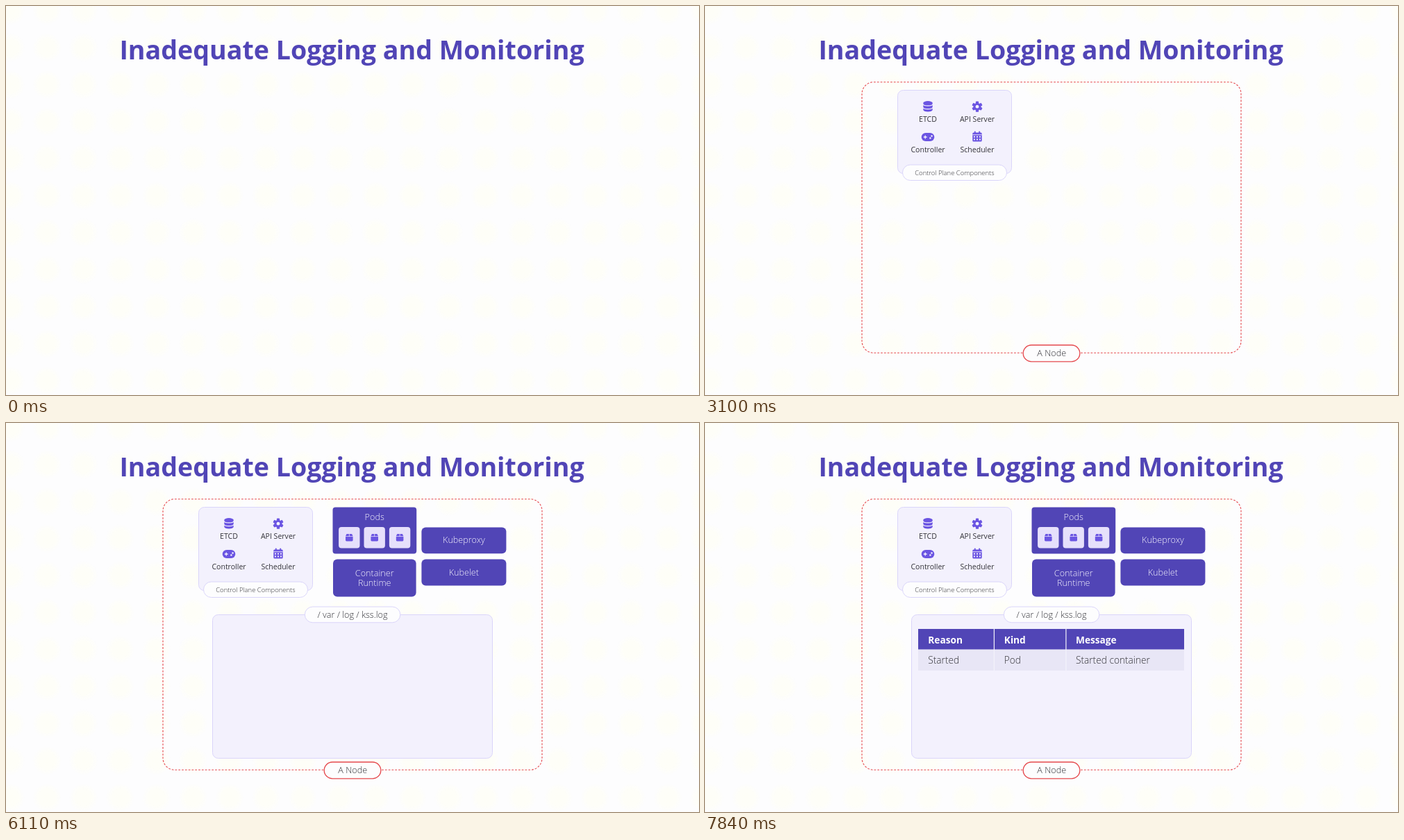
These frames come from a looping animation (998x561 px, 8 s). An HTML page with a canvas:

```html
<!DOCTYPE html>
<html lang="en">
<head>
<meta charset="utf-8">
<title>Inadequate Logging and Monitoring</title>
<style>
  html, body { margin: 0; width: 100%; height: 100%; overflow: hidden; background: #fdfdfe; }
  body {
    background-image: radial-gradient(circle, #fefef7 0, #fefef8 12px, transparent 21px);
    background-size: 52.6px 53.4px;
    background-position: -19.9px -20.2px;
  }
  canvas { display: block; width: 998px; height: 561px; }
</style>
</head>
<body>
<canvas id="stage"></canvas>
<script>
const W = 998, H = 561, LOOP = 8000;
const INDIGO = '#5145b6', VIOLET = '#6b55e2', LILAC = '#f3f1fd', EDGE = '#dad5fa';
const RED = '#e5484d', PAPER = '#fdfdfe', INK = '#333338', PALE = '#f4f2fd';
const dpr = window.devicePixelRatio || 1;

function prepare(canvas) {
  canvas.width = Math.round(W * dpr);
  canvas.height = Math.round(H * dpr);
  const c = canvas.getContext('2d');
  c.scale(dpr, dpr);
  return c;
}

function layer(draw) {
  const canvas = document.createElement('canvas');
  draw(prepare(canvas));
  return canvas;
}

function text(c, str, x, y, size, weight, color, align = 'center') {
  c.font = `${weight} ${size}px "Open Sans", sans-serif`;
  c.textAlign = align;
  c.fillStyle = color;
  c.fillText(str, x, y);
}

function box(c, x0, y0, x1, y1, r, fill, stroke, width = 1) {
  c.beginPath();
  c.roundRect(x0, y0, x1 - x0, y1 - y0, r);
  if (fill) { c.fillStyle = fill; c.fill(); }
  if (stroke) { c.strokeStyle = stroke; c.lineWidth = width; c.stroke(); }
}

function disc(c, x, y, r, fill) {
  c.beginPath();
  c.arc(x, y, r, 0, Math.PI * 2);
  c.fillStyle = fill;
  c.fill();
}

function database(c, x, y) {
  c.fillStyle = VIOLET;
  c.beginPath();
  c.ellipse(x, y - 5, 6.7, 2.7, 0, Math.PI, 0);
  c.lineTo(x + 6.7, y + 5);
  c.ellipse(x, y + 5, 6.7, 2.7, 0, 0, Math.PI);
  c.closePath();
  c.fill();
  c.strokeStyle = LILAC;
  c.lineWidth = 1.1;
  for (const dy of [-3.6, 1.1]) {
    c.beginPath();
    c.ellipse(x, y + dy, 7, 2.7, 0, 0, Math.PI);
    c.stroke();
  }
}

function gear(c, x, y) {
  disc(c, x, y, 5.5, VIOLET);
  for (let i = 0; i < 6; i++) {
    c.save();
    c.translate(x, y);
    c.rotate(i * Math.PI / 3);
    box(c, -2.1, -7.6, 2.1, -4, 0.9, VIOLET);
    c.restore();
  }
  disc(c, x, y, 2.4, LILAC);
}

function gamepad(c, x, y) {
  box(c, x - 9.3, y - 6, x + 9.3, y + 6, 6, VIOLET);
  box(c, x - 6.3, y - 0.7, x - 1.3, y + 0.7, 0.5, LILAC);
  box(c, x - 4.5, y - 2.5, x - 3.1, y + 2.5, 0.5, LILAC);
  disc(c, x + 3.4, y + 1.6, 1.25, LILAC);
  disc(c, x + 5.5, y - 1.6, 1.25, LILAC);
}

function calendar(c, x, y) {
  box(c, x - 6.7, y - 5.6, x + 6.7, y + 7.6, 1.5, VIOLET);
  for (const dx of [-3.2, 3.2]) box(c, x + dx - 0.9, y - 7.6, x + dx + 0.9, y - 3, 0.9, VIOLET);
  c.fillStyle = LILAC;
  c.fillRect(x - 6.7, y - 2.7, 13.4, 0.9);
  for (const dx of [-4, 0, 4])
    for (const dy of [0.6, 4.4]) c.fillRect(x + dx - 1, y + dy - 0.9, 2, 1.9);
}

function parcel(c, x, y) {
  box(c, x - 15.2, y - 15.2, x + 15.2, y + 15.2, 4, '#e6e0fb');
  c.fillStyle = VIOLET;
  for (const s of [-1, 1]) {
    c.beginPath();
    c.moveTo(x + s * 0.4, y - 5.2);
    c.lineTo(x + s * 3.8, y - 5.2);
    c.lineTo(x + s * 5.3, y - 2);
    c.lineTo(x + s * 0.4, y - 2);
    c.fill();
  }
  box(c, x - 5.3, y - 1.3, x + 5.3, y + 5.2, [0, 0, 1.4, 1.4], VIOLET);
}

const node = layer(c => {
  c.setLineDash([2.8, 2]);
  box(c, 226, 109.7, 772, 500.3, 17, null, RED, 1.1);
  c.setLineDash([]);
  box(c, 458.2, 489, 539.8, 512.8, 11.9, PAPER, RED, 1.3);
  text(c, 'A Node', 499.2, 505.3, 12.6, 300, INK);
});

const controlPlane = layer(c => {
  box(c, 277.5, 121.5, 441.5, 241.5, 8, LILAC, EDGE);
  database(c, 321, 144.8);
  gear(c, 392, 145.2);
  gamepad(c, 321, 189);
  calendar(c, 392, 188);
  text(c, 'ETCD', 321, 166.5, 10.55, 400, INK);
  text(c, 'API Server', 392, 166.5, 10.55, 400, INK);
  text(c, 'Controller', 321, 210.7, 10.55, 400, INK);
  text(c, 'Scheduler', 392, 210.7, 10.55, 400, INK);
  box(c, 284.5, 229, 434.5, 251.5, 11.2, PAPER, EDGE);
  text(c, 'Control Plane Components', 359.4, 243.6, 9.45, 300, INK);
});

const worker = layer(c => {
  box(c, 470.5, 121.5, 591.2, 188.6, 4, INDIGO);
  text(c, 'Pods', 530.7, 140.4, 12.65, 300, PALE);
  for (const x of [494.3, 530.7, 567.1]) parcel(c, x, 165.3);
  box(c, 471, 196.4, 590.6, 250.4, 6, INDIGO);
  text(c, 'Container', 530.7, 220.5, 12.65, 300, PALE);
  text(c, 'Runtime', 530.7, 234.7, 12.65, 300, PALE);
  box(c, 598.4, 150.4, 720.4, 188.2, 6, INDIGO);
  text(c, 'Kubeproxy', 659.4, 173.3, 12.65, 300, PALE);
  box(c, 598.4, 196.4, 720.4, 234.6, 6, INDIGO);
  text(c, 'Kubelet', 659.4, 219.5, 12.65, 300, PALE);
});

const logPanel = layer(c => {
  box(c, 297.5, 276.5, 700.5, 483.5, 8, LILAC, EDGE);
  box(c, 430.3, 265, 567.8, 287.8, 11.4, PAPER, EDGE);
  text(c, '/ var / log / kss.log', 499, 280.7, 12.6, 300, INK);
});

const TABLE = { left: 307, right: 690, top: 297, mid: 326.7, bottom: 357 };
const table = layer(c => {
  const { left, right, top, mid, bottom } = TABLE;
  c.fillStyle = INDIGO;
  c.fillRect(left, top, right - left, mid - top);
  c.fillStyle = '#e8e6f6';
  c.fillRect(left, mid, right - left, bottom - mid);
  c.fillStyle = '#f3f2fb';
  for (const x of [416.4, 519.9]) c.fillRect(x - 0.6, top, 1.2, bottom - top);
  const columns = [
    [321.3, 'Reason', 'Started'],
    [430.8, 'Kind', 'Pod'],
    [534, 'Message', 'Started container']
  ];
  for (const [x, head, cell] of columns) {
    text(c, head, x, 318.2, 13.7, 700, '#fff', 'left');
    text(c, cell, x, 346.6, 13.7, 300, INK, 'left');
  }
});

const stage = prepare(document.getElementById('stage'));
const maskCanvas = document.createElement('canvas');
const mask = prepare(maskCanvas);

const progress = (t, from, to) => Math.min(1, Math.max(0, (t - from) / (to - from)));

function stamp(c, image, alpha = 1) {
  if (!alpha) return;
  c.globalAlpha = alpha;
  c.drawImage(image, 0, 0, W, H);
  c.globalAlpha = 1;
}

// Reveals the table from the top with a soft lower edge.
function wipeTable(p) {
  if (!p) return;
  const soft = 32;
  const front = TABLE.top + p * (TABLE.bottom - TABLE.top + soft);
  const fade = mask.createLinearGradient(0, front - soft, 0, front);
  fade.addColorStop(0, 'rgba(0,0,0,1)');
  fade.addColorStop(1, 'rgba(0,0,0,0)');
  mask.clearRect(0, 0, W, H);
  stamp(mask, table);
  mask.globalCompositeOperation = 'destination-in';
  mask.fillStyle = fade;
  mask.fillRect(0, 0, W, H);
  mask.globalCompositeOperation = 'source-over';
  stamp(stage, maskCanvas);
}

function render(t) {
  stage.clearRect(0, 0, W, H);
  text(stage, 'Inadequate Logging and Monitoring', 498, 77, 37.6, 700, INDIGO);
  stamp(stage, node, progress(t, 300, 800));
  stamp(stage, controlPlane, progress(t, 2100, 2600));
  stamp(stage, worker, progress(t, 3400, 3900));
  stamp(stage, logPanel, progress(t, 5200, 5700));
  wipeTable(progress(t, 6400, 7000));
}

const start = performance.now();
function tick() {
  render((performance.now() - start) % LOOP);
  requestAnimationFrame(tick);
}
tick();
</script>
</body>
</html>
```
